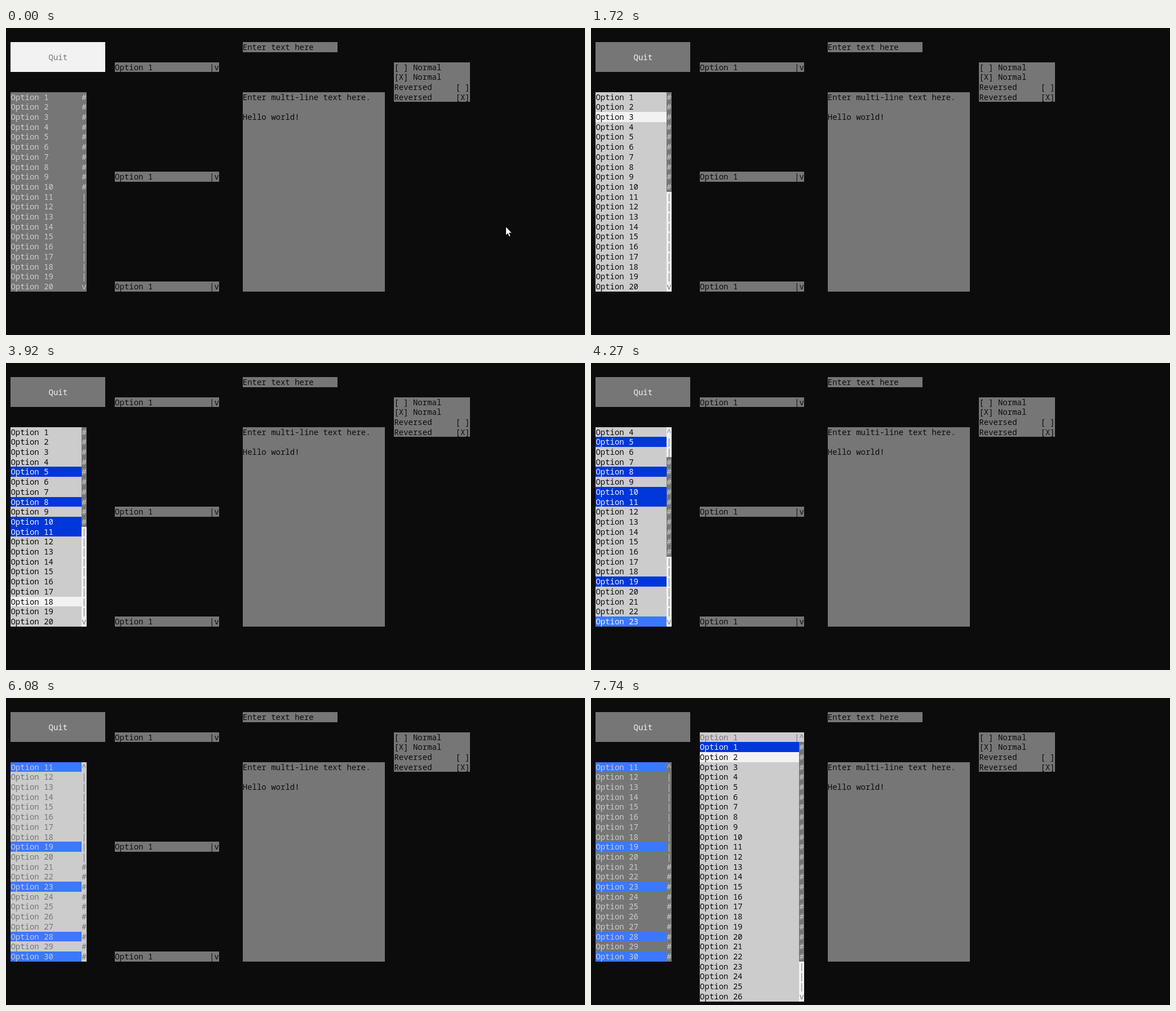
An HTML page that plays this animation: 1027 px wide and 545 px high, repeating every 8 s.

```html
<!DOCTYPE html>
<html lang="en">
<head>
<meta charset="utf-8">
<title>Terminal widgets</title>
<style>
  html, body { margin: 0; width: 100%; height: 100%; overflow: hidden; background: #0c0c0c; }
  #screen { position: absolute; left: 0; top: 0; width: 1027px; height: 545px; overflow: hidden; }
  #screen div {
    position: absolute; white-space: pre;
    font: 500 14px/18px "Noto Sans Mono", "DejaVu Sans Mono", monospace;
    font-variant-ligatures: none;
  }
  #pointer { position: absolute; left: 885px; top: 351px; }
</style>
</head>
<body>
<div id="screen"></div>
<svg id="pointer" width="14" height="22" viewBox="-1 -1 14 22">
  <path d="M.5 .5V16.2L4 12.9L6.4 18.4L9 17.3L6.6 11.9H11.3Z" fill="#fff" stroke="#000" stroke-width=".8"/>
</svg>
<script>
const LOOP = 8000;
const BLACK = '#0c0c0c', GRAY = '#767676', SILVER = '#cccccc', WHITE = '#f2f2f2';
const BLUE = '#0037da', SKY = '#3b78ff';
const COUNT = 30;

// Each step: start time, then the values that change. "pick" selects an option.
const steps = [
  [0, { focus: 'quit', cur: 1, pointer: true }],
  [720, { focus: 'list' }],
  [1260, { active: true, pointer: false }],
  [1520, { cur: 2 }], [1720, { cur: 3 }], [1850, { cur: 4 }], [1920, { cur: 5 }],
  [2320, { pick: 5 }], [2420, { cur: 6 }], [2520, { cur: 7 }],
  [2660, { cur: 8 }], [2790, { pick: 8 }], [2910, { cur: 10, pick: 10 }],
  [3020, { cur: 11, pick: 11 }], [3140, { cur: 12 }], [3250, { cur: 13 }],
  [3710, { cur: 14 }], [3780, { cur: 15 }], [3850, { cur: 17 }], [3920, { cur: 18 }],
  [3990, { cur: 19 }], [4060, { pick: 19 }], [4130, { cur: 21 }], [4200, { cur: 22 }],
  [4270, { cur: 23, pick: 23 }], [4340, { cur: 25 }], [4410, { cur: 27 }], [4480, { cur: 29 }],
  [4550, { cur: 30 }], [4950, { pick: 30 }],
  [5220, { cur: 29 }], [5320, { cur: 28, pick: 28 }], [5420, { cur: 27 }],
  [6080, { active: false }],
  [6480, { focus: 'quit' }],
  [6810, { focus: 'drop' }],
  [7540, { open: 1 }], [7740, { open: 2 }]
];

const screen = document.getElementById('screen');
const pointer = document.getElementById('pointer');
const px = col => Math.round(8.395 * col);
const py = row => Math.round(7.45 + 17.702 * row);
let html = '';

function box(col, row, cols, rows, bg) {
  const x = px(col), y = py(row);
  html += `<div style="left:${x}px;top:${y}px;width:${px(col + cols) - x}px;height:${py(row + rows) - y}px;background:${bg}"></div>`;
}

function text(col, row, str, color) {
  html += `<div style="left:${(8.395 * col).toFixed(2)}px;top:${py(row)}px;color:${color}">${str}</div>`;
}

function line(col, row, cols, str, [bg, fg]) {
  box(col, row, cols, 1, bg);
  text(col, row, str, fg);
}

// Scrollable options; the thumb moves one row per scrolled option.
function options({ col, row, cols, rows, top, cur, picked, active, base }) {
  const thumb = rows - (COUNT - rows);
  for (let i = 0; i < rows; i++) {
    const n = top + i + 1;
    const isPicked = picked.has(n), isCur = active && n === cur;
    let look = active ? [SILVER, BLACK] : base;
    if (isPicked) look = active ? [isCur ? SKY : BLUE, WHITE] : [SKY, SILVER];
    else if (isCur) look = [WHITE, BLACK];
    line(col, row + i, cols, 'Option ' + n, look);

    const onThumb = i >= top && i < top + thumb;
    const mark = onThumb ? '#' : i === 0 ? '^' : i === rows - 1 ? 'v' : '|';
    const bar = onThumb ? [GRAY, SILVER] : [WHITE, GRAY];
    line(col + cols, row + i, 1, mark, active ? bar : base);
  }
}

function dropdown(row, look, arrow = 'v') {
  line(23, row, 22, 'Option 1'.padEnd(20) + '|' + arrow, look);
}

function stateAt(index) {
  const state = { top: 0, picked: new Set() };
  for (const [, change] of steps.slice(0, index + 1)) {
    Object.assign(state, change);
    if (change.pick) state.picked.add(change.pick);
    state.top = Math.max(state.cur - 20, Math.min(state.top, state.cur - 1));
  }
  return state;
}

function draw(s) {
  const idle = [GRAY, BLACK];
  html = '';

  const quit = s.focus === 'quit' ? [WHITE, GRAY] : [GRAY, WHITE];
  box(1, 1, 20, 3, quit[0]);
  text(9, 2, 'Quit', quit[1]);

  options({
    col: 1, row: 6, cols: 15, rows: 20, top: s.top, cur: s.cur,
    picked: s.picked, active: s.active,
    base: s.focus === 'list' ? [SILVER, GRAY] : [GRAY, SILVER]
  });

  line(50, 1, 20, 'Enter text here', idle);
  box(50, 6, 30, 20, GRAY);
  text(50, 6, 'Enter multi-line text here.', BLACK);
  text(50, 8, 'Hello world!', BLACK);

  ['[ ] Normal', '[X] Normal', 'Reversed     [ ]', 'Reversed     [X]']
    .forEach((label, i) => line(82, 3 + i, 16, label, idle));

  dropdown(14, idle);
  dropdown(25, idle);
  if (s.open) {
    dropdown(3, [SILVER, GRAY], '^');
    options({
      col: 23, row: 4, cols: 21, rows: 26, top: 0, cur: s.open,
      picked: new Set([1]), active: true
    });
  } else {
    dropdown(3, s.focus === 'drop' ? [WHITE, GRAY] : idle);
  }

  screen.innerHTML = html;
  pointer.style.display = s.pointer ? 'block' : 'none';
}

const start = performance.now();
let shown = -1;

function tick() {
  const t = (performance.now() - start) % LOOP;
  const index = steps.filter(([at]) => at <= t).length - 1;
  if (index !== shown) draw(stateAt(shown = index));
  requestAnimationFrame(tick);
}
tick();
</script>
</body>
</html>
```
